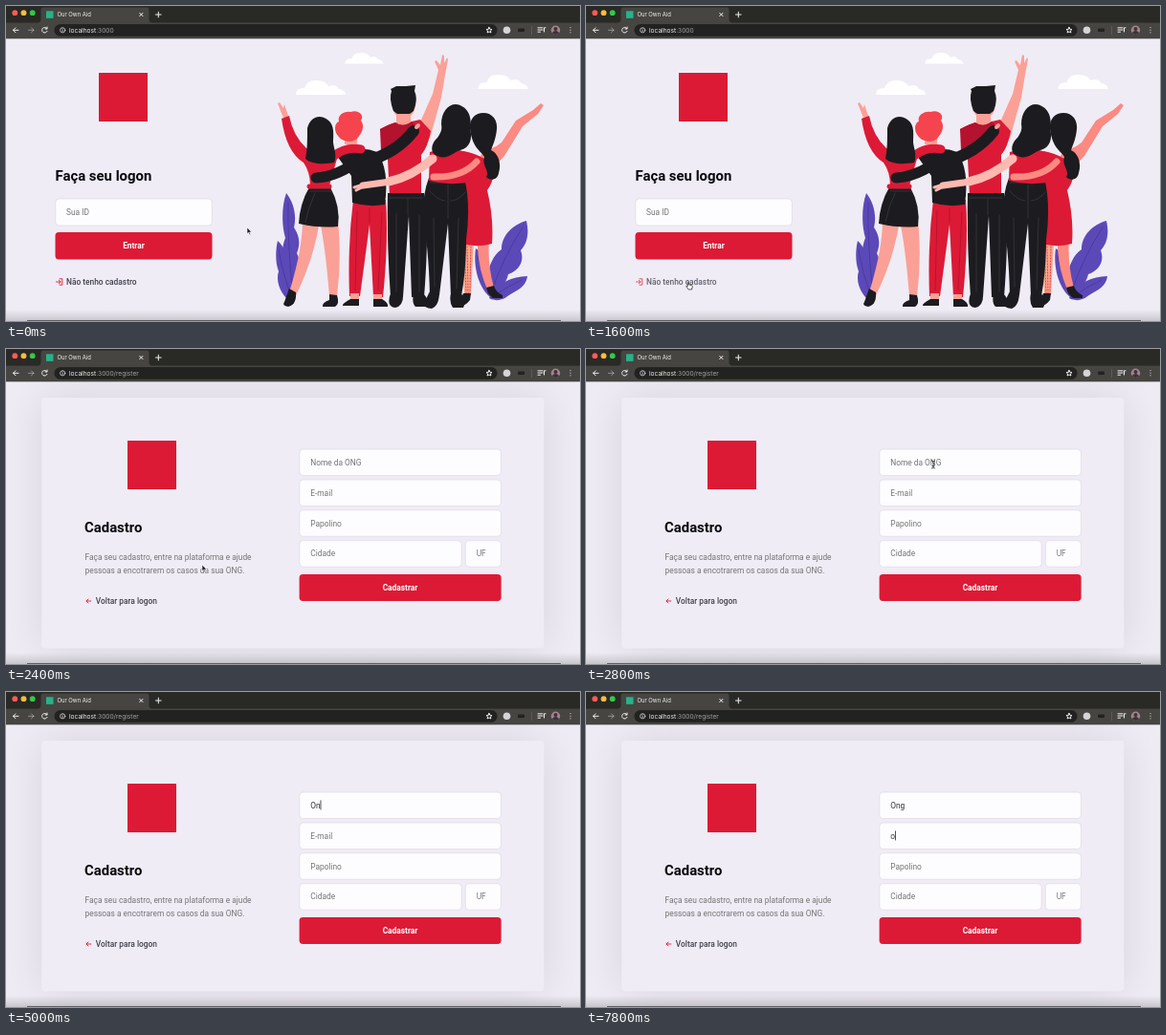
Animation of 600x330 px, one loop 8000 ms. Source, as an HTML page:

```html
<!DOCTYPE html>
<html lang="pt-BR">
<head>
<meta charset="utf-8">
<title>Our Own Aid</title>
<style>
  html, body { margin: 0; height: 100%; overflow: hidden; background: #efecf5; }
  svg { display: block; width: 100vw; height: 100vh; }
  text { font: 8.37px Roboto, sans-serif; fill: #757575; white-space: pre; }
  .ui { font-family: Inter, sans-serif; font-size: 6.6px; fill: #f0f0ee; }
  .dim { fill: #a3a3a1; }
  .title { font-size: 14.9px; font-weight: 700; fill: #08080d; }
  .button { font-weight: 700; fill: #fff; text-anchor: middle; }
  .link { font-weight: 500; fill: #41414d; }
  .typed { fill: #333; }
  .field { fill: #fdfcfe; stroke: #d9d6e2; stroke-width: .6; }
  .line { fill: none; stroke-linecap: round; stroke-linejoin: round; }
  .red { fill: #dc1a36; } .redline { stroke: #dc1a36; }
  .ink { fill: #1c1c20; } .inkline { stroke: #1c1c20; }
  .skin { fill: #fba096; } .skinline { stroke: #fba096; }
  .rose { fill: #fb8a82; } .roseline { stroke: #fb8a82; }
  .paleline { stroke: #fdb9b0; }
  .leaf { fill: #5c49b8; }
  .vein { stroke: #3e2f91; stroke-width: .6; }
  .seam { stroke: #55555c; stroke-width: .4; }
  .icon { stroke: #f0f0ee; stroke-width: 1; }
  .card { filter: drop-shadow(0 0 23px rgba(0, 0, 0, .1)); }
</style>
</head>
<body>
<svg viewBox="0 0 600 330" preserveAspectRatio="none">
  <defs>
    <linearGradient id="fade" x2="0" y2="1">
      <stop stop-color="#000" stop-opacity="0"/>
      <stop offset="1" stop-color="#000" stop-opacity=".16"/>
    </linearGradient>
  </defs>
  <rect width="600" height="330" fill="#efecf5"/>

  <g id="logon">
    <rect class="red" x="97" y="70" width="51" height="51"/>
    <text class="title" x="51.5" y="182.5">Faça seu logon</text>
    <rect class="field" x="51.8" y="202" width="163.5" height="28" rx="3.7"/>
    <text x="63" y="219">Sua ID</text>
    <rect class="red" x="51.5" y="237" width="164" height="28.4" rx="3.7"/>
    <text class="button" x="133.5" y="254">Entrar</text>
    <g id="signup">
      <path class="line redline" stroke-width=".9" d="M52.5 289H57M55.3 287.2L57.1 289L55.3 290.8M56 285.8H58.8V292.2H56"/>
      <text class="link" x="63" y="292">Não tenho cadastro</text>
    </g>

    <g id="clouds" fill="#fff">
      <path id="cloud" d="M303 93Q303 85.500 312 86Q315 77 325 78Q334 78 337 84Q345 81 348 87Q355 88 355 93Z"/>
      <use href="#cloud" x="190.500" y="-6"/>
      <use href="#cloud" transform="translate(121 -11) scale(.77)"/>
    </g>

    <g id="leaves">
      <path class="leaf" d="M297 304C290 290 290 280 293 272C287 262 289 250 292 243C288 230 288 210 293 196C301 206 304 220 301 232C308 242 307 252 304 259C310 270 308 294 300 310Z"/>
      <path class="leaf" d="M301 312C289 306 281 290 285 278C281 268 282 254 284 246C293 254 294 266 293 272C300 280 299 290 300 300Z"/>
      <path class="leaf" d="M507 300C499 285 506 263 518 255C518 240 530 229 544 225C547 238 545 249 538 256C543 269 534 278 525 281C523 291 515 298 507 300Z"/>
      <path class="leaf" d="M506 305C494 295 488 273 491 254C500 259 508 276 510 297Z"/>
      <path class="leaf" d="M505 306C513 291 526 284 545 283C543 297 530 299 523 305C517 309 510 309 505 306Z"/>
      <path class="line vein" d="M300 302Q294 250 295 206M300 308Q289 282 285 255M507 301Q519 264 540 232M507 305Q498 280 493 262M507 306Q523 294 539 287"/>
    </g>

    <g id="dress-woman">
      <path class="rose" d="M499 151Q508 151 518 143L533 120L551 109L559 102L562 104L556 113L540 126L521 157L507 172L493 163Z"/>
      <path class="rose" d="M493 244H505Q503 270 510 295L503 297Q492 271 493 244Z"/>
      <path d="M476 247H489L486 303H479Z" fill="#f9a88c"/>
      <path class="line redline" stroke-width=".8" stroke-dasharray="1 2" d="M479 249L481 301M482 249L483 301M486 249L485 300"/>
      <path class="ink" d="M502 295L510 293Q512 300 519 303V306H509L504 301ZM478 301H486L485 308Q479 316 472 314Q471 311 475 308Z"/>
      <path class="red" d="M478 152Q490 154 500 160L510 165Q512 180 503 193Q510 222 508 249Q490 254 473 248Q477 212 475 184Z"/>
      <path class="ink" d="M485 129C484 119 490 112 499 112C508 112 514 119 513 129C512 140 509 145 507 151C515 155 518 165 515 175C514 182 506 184 502 179C506 173 497 167 500 158C496 151 488 150 485 129Z"/>
    </g>

    <g id="skirt-woman">
      <path class="skin" d="M291 120L284 102L286 101L290 107L291 103L296 118Z"/>
      <path class="red" d="M288 118L296 115Q300 136 314 149Q334 151 346 160L338 188H318Q318 174 311 164Q293 153 288 118Z"/>
      <path class="skin" d="M310 224H328Q322 265 303 303L296 300Q310 255 310 224ZM328 225H347Q351 265 346 304H338Q334 254 328 225Z"/>
      <path class="ink" d="M296 296L303 300Q304 313 295 315Q288 314 291 310ZM338 302L346 303Q349 312 344 315H331Q330 311 338 308Z"/>
      <path class="ink" d="M317 190H339Q350 210 347 231Q327 233 306 228Q307 207 317 190Z"/>
      <path class="line seam" d="M318 194H340M323 196Q316 211 313 226"/>
      <path class="line redline" stroke-width="5" d="M317 189H338"/>
    </g>

    <g id="man">
      <path class="skin" d="M431 126L446 92L452 67L448 58L450 57L454 62L456 51L458 52L458 60L461 54L462 56L459 72L455 96L443 139Z"/>
      <path class="skin" d="M408 108H423V128H408Z"/>
      <path class="red" d="M391 129Q400 124 407 122Q415 128 424 121L433 119L444 131Q441 148 434 156V200H401L399 160Z"/>
      <path d="M391 129Q400 124 407 122Q415 128 424 121L429 126L405 152H392Z" fill="#b3132e"/>
      <path class="skin" d="M403 95Q402 116 416 119Q429 116 429 95Z"/>
      <path class="ink" d="M405 110Q400 97 403 89L402 87L408 84H418L428 83L427 89Q431 97 426 110L422 113H409Z"/>
      <path class="ink" d="M399 196H437Q443 229 437 305H424L421 220L415 305H402Q398 250 399 196ZM402 301H415Q416 314 407 316Q397 315 402 301ZM426 302H437Q444 311 440 315H428Q424 311 426 302Z"/>
      <path class="line seam" d="M401 201H435M420 202V219M408 218V299M432 219V299"/>
    </g>

    <g id="red-haired">
      <path class="red" d="M363 203H397Q400 247 394 305H384L380 229L370 304H359Q357 250 363 203Z"/>
      <path class="skin" d="M360 301H369V310H360ZM384 302H393V310H384Z"/>
      <path class="ink" d="M360 307H369V314H352Q351 312 360 307ZM384 307H393Q400 311 399 315H384Z"/>
      <path class="ink" d="M346 157Q368 145 388 153Q401 171 396 208Q378 211 362 206L361 178Z"/>
      <path class="line inkline" stroke-width="12" d="M376 163Q408 154 426 131"/>
      <path class="line inkline" stroke-width="11" d="M370 161Q346 179 324 180"/>
      <path class="line skinline" stroke-width="4" d="M429 127L431 125"/>
      <path class="line" stroke="#a20f28" stroke-width=".6" d="M380 212V227M367 215L365 298M393 216L389 297"/>
      <path class="line redline" stroke-width="9" d="M343 157Q355 147 371 150"/>
      <path class="skin" d="M354 133H367V145H354Z"/>
      <path d="M347 136C342 130 344 122 348 121C346 114 354 110 360 111C369 108 375 115 371 120C376 127 371 134 367 139C361 144 351 142 347 136Z" fill="#f6444e"/>
    </g>

    <path id="long-hair" class="ink" d="M315 128C318 116 328 113 336 119C344 124 342 136 342 143C343 150 346 157 343 164C333 166 319 166 313 160C315 151 315 140 315 128Z"/>

    <g id="front-woman">
      <path class="ink" d="M442 180H479Q486 207 481 245Q481 276 476 304H465L462 228L453 303H443Q442 257 436 222Q435 199 442 180ZM443 299H453Q453 314 445 317Q434 316 438 309ZM465 301H476Q481 311 478 316H467Q463 310 465 301Z"/>
      <path class="line seam" d="M443 185H479M462 187V222M443 194Q452 204 459 204M465 204Q473 204 480 195M447 222L448 294M473 222L471 296"/>
      <path class="red" d="M443 153Q464 145 486 155Q487 171 480 185Q461 188 442 183Z"/>
      <path class="line roseline" stroke-width="7" d="M492 163Q477 180 447 179"/>
      <path class="line paleline" stroke-width="9" d="M446 160Q424 179 400 184"/>
      <path class="line paleline" stroke-width="7" d="M402 184L373 188"/>
      <path class="line paleline" stroke-width="3" d="M374 187L364 190M374 189L366 193"/>
      <path class="ink" d="M455 124C455 111 462 103 470 103C482 104 488 116 485 129C488 138 485 149 475 151C468 153 461 162 451 157C442 154 445 143 451 138C455 132 456 129 455 124Z"/>
    </g>
  </g>

  <g id="register">
    <rect class="card" x="37.300" y="51" width="525" height="262.500" rx="3.700" fill="#efecf5"/>
    <rect class="red" x="127" y="96" width="51" height="51"/>
    <text class="title" x="82" y="191.500">Cadastro</text>
    <text x="82.500" y="220.500">Faça seu cadastro, entre na plataforma e ajude</text>
    <text x="82.500" y="235.400">pessoas a encotrarem os casos da sua ONG.</text>
    <path class="line redline" stroke-width=".9" d="M88.800 264H84M86 262L84 264L86 266"/>
    <text class="link" x="93.800" y="267">Voltar para logon</text>
    <g id="fields"></g>
    <rect class="red" x="306.600" y="236" width="211" height="28" rx="3.700"/>
    <text class="button" x="412" y="253">Cadastrar</text>
    <rect id="caret" width=".8" height="10" fill="#222"/>
  </g>

  <g id="browser">
    <rect width="600" height="18" fill="#292926"/>
    <path d="M33 18Q36.500 17 36.500 14V4Q36.500 1.500 39 1.500H147Q149.500 1.500 149.500 4V14Q149.500 17 153 18Z" fill="#464541"/>
    <rect y="17.500" width="600" height="16.800" fill="#464541"/>
    <circle cx="9.300" cy="7.200" r="2.900" fill="#fc5b57"/>
    <circle cx="18.500" cy="7.200" r="2.900" fill="#fdbc40"/>
    <circle cx="27.700" cy="7.200" r="2.900" fill="#34c84a"/>
    <rect x="42" y="5.300" width="7.500" height="7.500" fill="#27b388"/>
    <text class="ui" x="53.500" y="11.200" style="font-size:5.9px">Our Own Aid</text>
    <path class="line icon" d="M139.700 7.300L143 10.600M143 7.300L139.700 10.600M156.500 9H162.100M159.300 6.200V11.800"/>
    <path class="line icon" d="M13 25.300H7.500M10 22.800L7.500 25.300L10 27.800M42.800 23.700A2.800 2.800 0 1 0 43 26.400M43 22V24H41"/>
    <path class="line icon" opacity=".45" d="M23.500 25.300H29M26.500 22.800L29 25.300L26.500 27.800"/>
    <rect x="50.500" y="19" width="463" height="12.800" rx="6.400" fill="#222320"/>
    <g class="line icon"><circle cx="59.200" cy="25.300" r="2.600" stroke-width=".7"/><path stroke-width=".7" d="M59.200 25V26.700M59.200 23.800V23.900"/></g>
    <text class="ui" x="66" y="27.700">localhost<tspan id="path" class="dim"></tspan></text>
    <path class="line icon" stroke-width=".7" d="M505 22.300L505.900 24.300L508 24.500L506.400 25.900L506.900 28L505 26.900L503.100 28L503.600 25.900L502 24.500L504.100 24.300Z"/>
    <circle cx="523.500" cy="25.300" r="3.800" fill="#d4d5d6"/>
    <rect x="535" y="23.600" width="7" height="3.400" rx="1" fill="#22221f"/>
    <path stroke="#6a6965" stroke-width=".6" d="M549.500 21V30"/>
    <path class="line icon" d="M556 22.800H561M556 25H561M556 27.200H558.500M562.500 27V22.800H564"/>
    <circle cx="574.500" cy="25.300" r="4.700" fill="#a58489"/>
    <path d="M571 28.500Q571.500 26 574.500 26Q577.500 26 578 28.500Q574.500 31.400 571 28.500Z" fill="#3b333b"/>
    <circle cx="574.500" cy="24" r="2" fill="#3b333b"/>
    <path class="line icon" stroke-width="1.300" d="M590 22.600V22.700M590 25.200V25.300M590 27.800V27.900"/>
    <rect y="318" width="600" height="12" fill="url(#fade)"/>
    <rect x="22" y="329.100" width="558" height=".9" fill="#55545a"/>
  </g>

  <g id="status">
    <path d="M0 320H197.500Q199.500 320 199.500 322V330H0Z" fill="#3d3d3a"/>
    <text class="ui dim" x="2.500" y="327.200" style="font-size:5.5px">localhost:3000/register</text>
  </g>

  <g id="arrow"><path class="ink" stroke="#fff" stroke-width=".6" d="M0 0V6.600L1.500 5.300L2.600 7.800L3.700 7.300L2.600 4.900H4.700Z"/></g>
  <g id="hand"><path fill="#fff" stroke="#111" stroke-width=".7" stroke-linejoin="round" d="M-.7 .3Q0 -.5 .6 .3V3L3.700 3.700Q4.500 4 4.200 5.300L3.500 8H.2L-2.300 4.800Q-2.200 3.700 -.7 4.700Z"/></g>
  <g id="beam"><path class="line" stroke="#222" stroke-width=".8" d="M-1.500 -4Q0 -4 0 -3V3Q0 4 -1.500 4M1.500 -4Q0 -4 0 -3M0 3Q0 4 1.500 4M-1 1.500H1"/></g>
</svg>

<script>
const LOOP = 8000, STEP = 200;
const $ = id => document.getElementById(id);
const show = (id, on) => $(id).style.display = on ? '' : 'none';

// Form fields: placeholder, x, y, width
const texts = [
  ['Nome da ONG', 306.8, 105, 210.6],
  ['E-mail', 306.8, 137, 210.6],
  ['Papolino', 306.8, 168.8, 210.6],
  ['Cidade', 306.8, 200.7, 169.4],
  ['UF', 480.3, 200.7, 37.1],
].map(([label, x, y, width]) => {
  $('fields').insertAdjacentHTML('beforeend',
    `<rect class="field" x="${x}" y="${y}" width="${width}" height="27.500" rx="3.700"/>
     <text x="${x + 11.4}" y="${y + 16.7}">${label}</text>`);
  return Object.assign($('fields').lastElementChild, { label });
});

// Cursor positions: time, x, y
const moves = [
  [0, 252, 232], [600, 205, 259], [800, 205, 259], [1200, 135, 284], [1600, 107, 289],
  [2000, 107, 289], [2400, 205, 226], [2800, 363, 121],
];

// Form states: time, name, e-mail, field holding the visible caret (-1 for none)
const typing = [
  [0, '', '', -1], [3000, '', '', 0], [3400, '', '', -1],
  [4000, 'O', '', 0], [4400, 'O', '', -1], [4800, 'O', '', 0],
  [5000, 'On', '', 0], [5400, 'On', '', -1], [5800, 'Ong', '', 0],
  [6200, 'Ong', '', 1], [6800, 'Ong', '', -1], [7200, 'Ong', '', 1], [7800, 'Ong', 'o', 1],
];

function cursorAt(t) {
  const next = moves.findIndex(m => m[0] > t);
  if (next < 0) return moves.at(-1).slice(1);
  const [t0, x0, y0] = moves[next - 1], [t1, x1, y1] = moves[next];
  const k = (t - t0) / (t1 - t0);
  return [x0 + (x1 - x0) * k, y0 + (y1 - y0) * k];
}

function drawForm(t) {
  const [, name, email, focus] = typing.findLast(s => s[0] <= t);
  [name, email].forEach((value, i) => {
    texts[i].textContent = value || texts[i].label;
    texts[i].classList.toggle('typed', !!value);
  });
  show('caret', focus >= 0);
  if (focus < 0) return;
  const field = texts[focus];
  const width = field.classList.contains('typed') ? field.getComputedTextLength() : 0;
  $('caret').setAttribute('x', +field.getAttribute('x') + width);
  $('caret').setAttribute('y', field.getAttribute('y') - 8.3);
}

function draw(now) {
  const t = Math.floor(now % LOOP / STEP) * STEP;
  const registering = t >= 1800;
  show('logon', !registering);
  show('register', registering);
  show('status', registering && t < 2400);
  $('path').textContent = registering ? ':3000/register' : ':3000';
  $('signup').style.opacity = t >= 1400 ? .8 : 1;
  if (registering) drawForm(t);

  const pointer = t >= 4000 ? '' : t >= 2800 ? 'beam' : t >= 1400 && t < 2200 ? 'hand' : 'arrow';
  for (const id of ['arrow', 'hand', 'beam']) show(id, id === pointer);
  if (pointer) $(pointer).setAttribute('transform', `translate(${cursorAt(t)})`);
  requestAnimationFrame(() => draw(performance.now() - start));
}

const start = performance.now();
draw(0);
</script>
</body>
</html>
```
